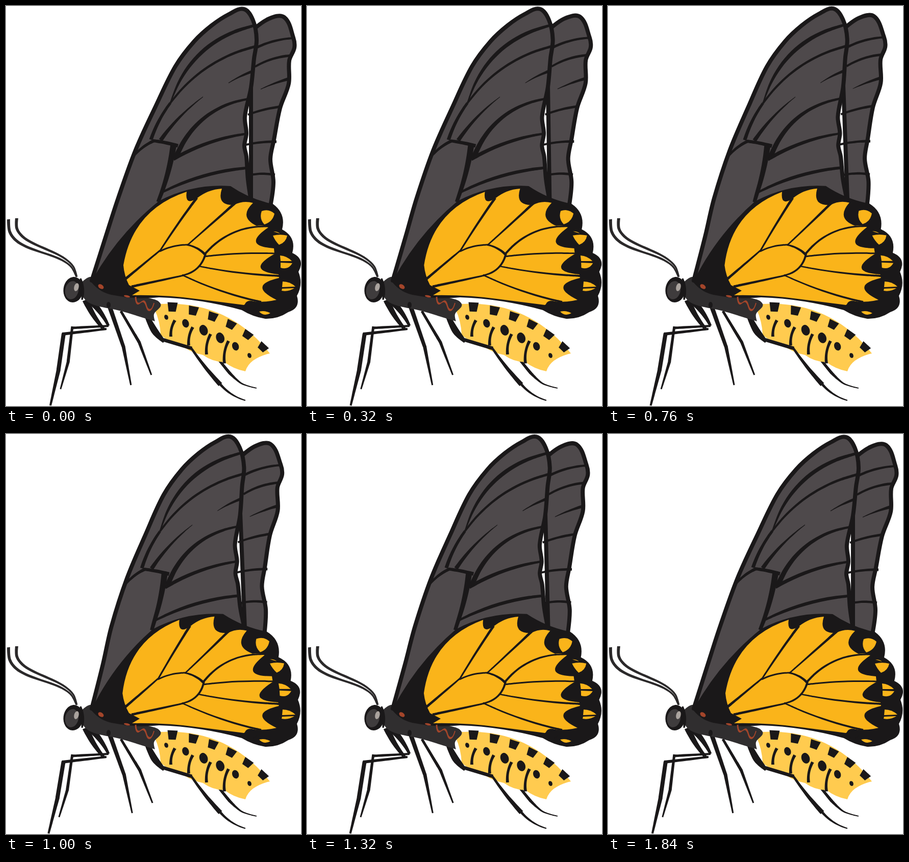
An HTML page for the animation above (1.88 s loop, 578 by 784 pixels).

```html
<!DOCTYPE html>
<html lang="en">
<head>
<meta charset="utf-8">
<title>Butterfly</title>
<style>
  html, body { margin: 0; width: 100%; height: 100%; overflow: hidden; background: #fff; }
  svg { display: block; width: 578px; height: 784px; stroke-linejoin: round; }
</style>
</head>
<body>
<svg id="stage" viewBox="0 0 578 784"></svg>
<script>
const BLACK = '#1a1819', GRAY = '#4e494b', DARK = '#302e2f';
const GOLD = '#fab41a', LEMON = '#ffcb4f', RED = '#a3452a';
const STEP = 40, HALF = 23, FRAMES = 47;

const stage = document.getElementById('stage');
const moving = [];

// Points are "x,y" or "x,y,v"; a trailing "!" makes a corner.
const parse = text => text.trim().split(/\s+/).map(t => {
  const [x, y, v] = t.replace('!', '').split(',').map(Number);
  return { x, y, v, sharp: t.endsWith('!') };
});
const at = (x, y) => x.toFixed(2) + ',' + y.toFixed(2) + ' ';
const range = (n, make) => Array.from({ length: n }, (_, i) => make(i, i / (n - 1)));

function unit(a, b) {
  const dx = b.x - a.x, dy = b.y - a.y, len = Math.hypot(dx, dy) || 1;
  return { x: dx / len, y: dy / len };
}

// Closed smooth curve through the points
function traceSmooth(pts) {
  const n = pts.length, pt = i => pts[(i + n) % n];
  const dir = i => pt(i).sharp ? { x: 0, y: 0 } : unit(pt(i - 1), pt(i + 1));
  let d = 'M' + at(pts[0].x, pts[0].y);
  for (let i = 0; i < n; i++) {
    const a = pt(i), b = pt(i + 1), u = dir(i), v = dir(i + 1);
    const h = Math.hypot(b.x - a.x, b.y - a.y) / 3;
    d += 'C' + at(a.x + u.x * h, a.y + u.y * h) + at(b.x - v.x * h, b.y - v.y * h) + at(b.x, b.y);
  }
  return d + 'Z';
}

// Clockwise chain of arcs; v is how far each arc bulges outward, relative to its length
function traceArcs(pts) {
  return pts.reduce((d, a, i) => {
    const b = pts[(i + 1) % pts.length], k = 2 * a.v;
    return d + 'Q' + at((a.x + b.x) / 2 + (b.y - a.y) * k, (a.y + b.y) / 2 - (b.x - a.x) * k) + at(b.x, b.y);
  }, 'M' + at(pts[0].x, pts[0].y)) + 'Z';
}

// Open line whose width at each point is v
function traceRibbon(pts) {
  const left = [], right = [], last = pts.length - 1;
  pts.forEach((p, i) => {
    const t = unit(pts[Math.max(i - 1, 0)], pts[Math.min(i + 1, last)]);
    const sharp = p.sharp || i === 0 || i === last, r = p.v / 2;
    left.push({ x: p.x - t.y * r, y: p.y + t.x * r, sharp });
    right.unshift({ x: p.x + t.y * r, y: p.y - t.x * r, sharp });
  });
  return traceSmooth(left.concat(right));
}

const smooth = text => ({ pts: parse(text), trace: traceSmooth });
const arcs = text => ({ pts: parse(text), trace: traceArcs });
const ribbon = text => ({ pts: parse(text), trace: traceRibbon });

// Bent line from a to b, going from width w0 to w1 with an extra swell in the middle
function vein(ax, ay, bx, by, bend, w0, w1, swell = 0) {
  const pts = range(7, (i, t) => {
    const hump = 4 * t * (1 - t);
    return {
      x: ax + (bx - ax) * t + (by - ay) * bend * hump,
      y: ay + (by - ay) * t - (bx - ax) * bend * hump,
      v: w0 + (w1 - w0) * t + swell * hump,
    };
  });
  return { pts, trace: traceRibbon };
}

function blob(x, y, rx, ry, turn = 0) {
  const c = Math.cos(turn), s = Math.sin(turn);
  const pts = range(8, i => {
    const u = rx * Math.cos(i * Math.PI / 4), v = ry * Math.sin(i * Math.PI / 4);
    return { x: x + u * c - v * s, y: y + u * s + v * c };
  });
  return { pts, trace: traceSmooth };
}

const quad = (a, q, b, t) => a * (1 - t) ** 2 + 2 * q * t * (1 - t) + b * t * t;
const cubic = (a, p, q, b, t) => quad(a, p, q, t) * (1 - t) + quad(p, q, b, t) * t;

function draw(fill, move, shapes, border = 0) {
  for (const { pts, trace } of shapes) {
    const el = document.createElementNS('http://www.w3.org/2000/svg', 'path');
    el.setAttribute('fill', fill);
    el.setAttribute('d', trace(pts));
    if (border) {
      el.setAttribute('stroke', BLACK);
      el.setAttribute('stroke-width', border);
    }
    stage.append(el);
    if (move) moving.push({ el, pts, trace, move });
  }
}

// Wings lean left, fading out towards the body; legs shear a little below a pivot.
const wing = (p, k) => {
  const s = (29.5 - 0.038 * p.y) * Math.max(0, Math.min(1, (540 - p.y) / 170)) * k;
  return { ...p, x: p.x - s, y: p.y - s * (p.x - 400) / 2000 };
};
const shear = (pivot, slope) => (p, k) => ({ ...p, x: p.x + Math.max(0, p.y - pivot) * slope * k });
const foreleg = shear(630, -0.026), midleg = shear(590, 0.018);

// Antennae
const antenna = (xs, ys) => ({
  pts: range(9, (i, t) => ({ x: cubic(...xs, t), y: cubic(...ys, t), v: 6 - 3 * t })),
  trace: traceRibbon,
});
draw('#2b292a', null, [
  antenna([5, -5, 125, 138], [418, 495, 470, 531]),
  antenna([21, 5, 135, 139], [416, 478, 470, 531]),
]);

// Far hind leg and abdomen
draw(BLACK, null, [ribbon('414,690,5 438,719,6! 462,740,3 491,749,2')]);
draw(LEMON, null, [arcs(`291,594,0 303,584,.13 517,681,-.05 484,695,-.08 469,716,.06 428,698,.08
  386,684,.06 340,663,.06 303,645,-.05`)]);
draw(BLACK, null, range(6, (i, t) => {
  const x = quad(326, 431, 503, t), y = quad(590, 603, 669, t), turn = 0.05 + 0.7 * t;
  const c = Math.cos(turn), s = Math.sin(turn), h = 9 - 2 * t;
  const corner = (u, v) => at(x + u * c - v * s, y + u * s + v * c).trim() + ',0 ';
  return arcs(corner(-10, -h) + corner(10, -h) + corner(7, h) + corner(-7, h));
}));
draw(BLACK, null, range(6, (i, t) => {
  const r = 5 + 6 * Math.sin(Math.PI * t);
  return blob(quad(314, 412, 477, t), quad(610, 638, 685, t), r * 0.75, r, -0.35);
}));
draw(BLACK, null, range(4, i => {
  const x = 327 + 35 * i, y = 632 + 15.5 * i, h = 16 + 2 * i;
  return vein(x + 4, y - h, x - 4, y + h, -0.08, 6, 6, -1);
}));

// Near hind leg
draw(BLACK, null, [
  ribbon('275,606,8 292,638,13 310,658,6'),
  vein(304, 653, 364, 671, 0, 7, 7),
  vein(362, 669, 420, 742, -0.02, 4, 9),
  vein(417, 738, 469, 773, -0.08, 5, 2),
]);

// Front and middle legs
draw(BLACK, foreleg, [
  vein(156, 576, 192, 634, -0.04, 13, 6),
  vein(168, 580, 201, 627, 0.04, 13, 5),
  vein(201, 627, 129, 631, 0, 4, 5),
  vein(197, 633, 110, 643, 0, 4, 6),
  ribbon('130,628,5 122,697,6! 107,751,3'),
  ribbon('113,642,8 103,713,8! 87,783,4'),
]);
draw(BLACK, midleg, [
  ribbon('200,580,9 230,667,7! 245,743,3'),
  ribbon('225,598,5 261,659,6! 285,723,3'),
]);

// Thorax and head
draw(DARK, null, [smooth(`148,542! 166,531 205,548 276,571 303,584 290,604 292,618! 275,613
  222,597 170,585 151,570`)]);
draw(BLACK, null, [
  blob(201, 586, 4, 6),
  blob(132, 556, 19.5, 25, 0.12),
  vein(146, 534, 149, 576, 0.06, 3, 3, 3),
]);
draw('#3f3c3d', null, [blob(129, 557, 13, 18, 0.2)]);
draw('#aaa39e', null, [blob(138, 551, 4.5, 8, 0.25)]);

// Far forewing
draw(GRAY, wing, [smooth(`480,50! 515,25 545,22 563,62 565,82 555,107 554,152 537,200 525,262
  518,300 524,345 518,392! 480,392!`)], 8);
draw(BLACK, wing, [
  vein(492, 81, 563, 63, 0.05, 5, 4),
  vein(488, 119, 560, 97, 0.06, 4, 5),
  vein(499, 163, 553, 143, 0.02, 1, 6),
  vein(474, 213, 540, 197, 0.03, 4, 5),
  vein(470, 272, 530, 266, 0.03, 4, 5),
  vein(474, 332, 527, 331, 0.05, 4, 5),
]);

// Near forewing
draw(GRAY, wing, [smooth(`168,538! 196,450 220,376 254,282 293,197 332,118 369,69 403,38 437,16
  466,6 484,28 491,66 486,103 480,160 468,217 471,250 467,274 471,295 474,340 480,381!
  300,430! 200,545!`)], 8);
draw(BLACK, wing, [
  vein(322, 190, 487, 38, 0.14, 2, 5, 4),
  vein(284, 262, 322, 190, 0.04, 7, 5),
  vein(322, 190, 490, 79, 0.09, 4, 5),
  vein(436, 151, 486, 127, 0.03, 1, 6),
  vein(303, 263, 386, 178, 0.04, 8, 1),
  vein(333, 296, 480, 181, 0.14, 10, 4),
  vein(328, 300, 474, 250, 0.05, 7, 4, 1),
  vein(302, 367, 476, 317, 0.05, 4, 5, 2),
  vein(246, 299, 290, 264, 0.06, 4, 6),
  vein(288, 264, 337, 274, 0.02, 6, 7),
  vein(328, 274, 298, 384, 0.03, 12, 7),
]);

// Hind wing
draw(BLACK, wing, [arcs(`167,541,.05 300,382,.07 440,353,-.05 523,388,.17 541,438,.2 561,484,.27
  573,521,.12 570,568,.25 553,600,.08 508,613,.05 462,596,-.03 300,571,.04 212,567,.1`)]);
draw(GOLD, wing, [arcs(`230,508,.15 354,364,-.55 374,377,.08 423,358,-.36 447,390,.1 484,386,-.36
  491,431,.08 514,434,-.72 525,475,0 526,486,-.78 534,526,0 535,533,-.7 530,576,.05 478,578,0
  466,586,0 380,575,-.02 247,567,0 262,558,0 241,547,.05`)]);
draw(BLACK, wing, [
  vein(234, 535, 302, 479, 0, 5, 3),
  vein(301, 481, 374, 376, 0.01, 3, 5),
  vein(301, 481, 356, 468, 0.06, 3, 3),
  vein(355, 469, 448, 387, 0, 2.5, 5),
  vein(355, 468, 391, 488, 0.08, 3, 5),
  vein(388, 488, 514, 432, 0.12, 4, 3),
  vein(388, 491, 528, 485, 0.02, 3, 3),
  vein(391, 486, 346, 528, 0.15, 4, 3),
  vein(378, 510, 536, 529, -0.02, 2.5, 4),
  vein(246, 550, 348, 528, 0, 5, 3),
  vein(345, 527, 500, 580, -0.03, 2.5, 4),
  blob(480, 587, 12, 9, 0.2),
]);
draw(GOLD, wing, [
  arcs('501,402,.15 526,407,.15 506,428,.15'),
  arcs('523,450,.06 551,450,.15 535,468,.05'),
  arcs('524,442,.1 537,446,0'),
  arcs('537,489,.1 560,500,0 538,500,0'),
  arcs('538,503,0 561,504,.2 538,513,0'),
  arcs('542,540,.1 567,550,0 541,551,0'),
  arcs('541,554,0 565,553,.1 540,558,0'),
  arcs('496,599,.1 518,602,.2'),
]);

// Thorax markings
draw(RED, null, [
  blob(186, 550, 6, 4, 0.6),
  blob(237, 569, 6, 2, 0.2),
  ribbon('254,570,3 258,583,4 270,579,4 281,596,4 290,582,2'),
]);

let shown = -1;
function render(now) {
  const i = Math.floor(now / STEP) % FRAMES;
  if (i !== shown) {
    shown = i;
    const k = 1 - Math.abs(i - HALF) / HALF;
    for (const { el, pts, trace, move } of moving) {
      el.setAttribute('d', trace(pts.map(p => move(p, k))));
    }
  }
  requestAnimationFrame(render);
}
render(performance.now());
</script>
</body>
</html>
```
